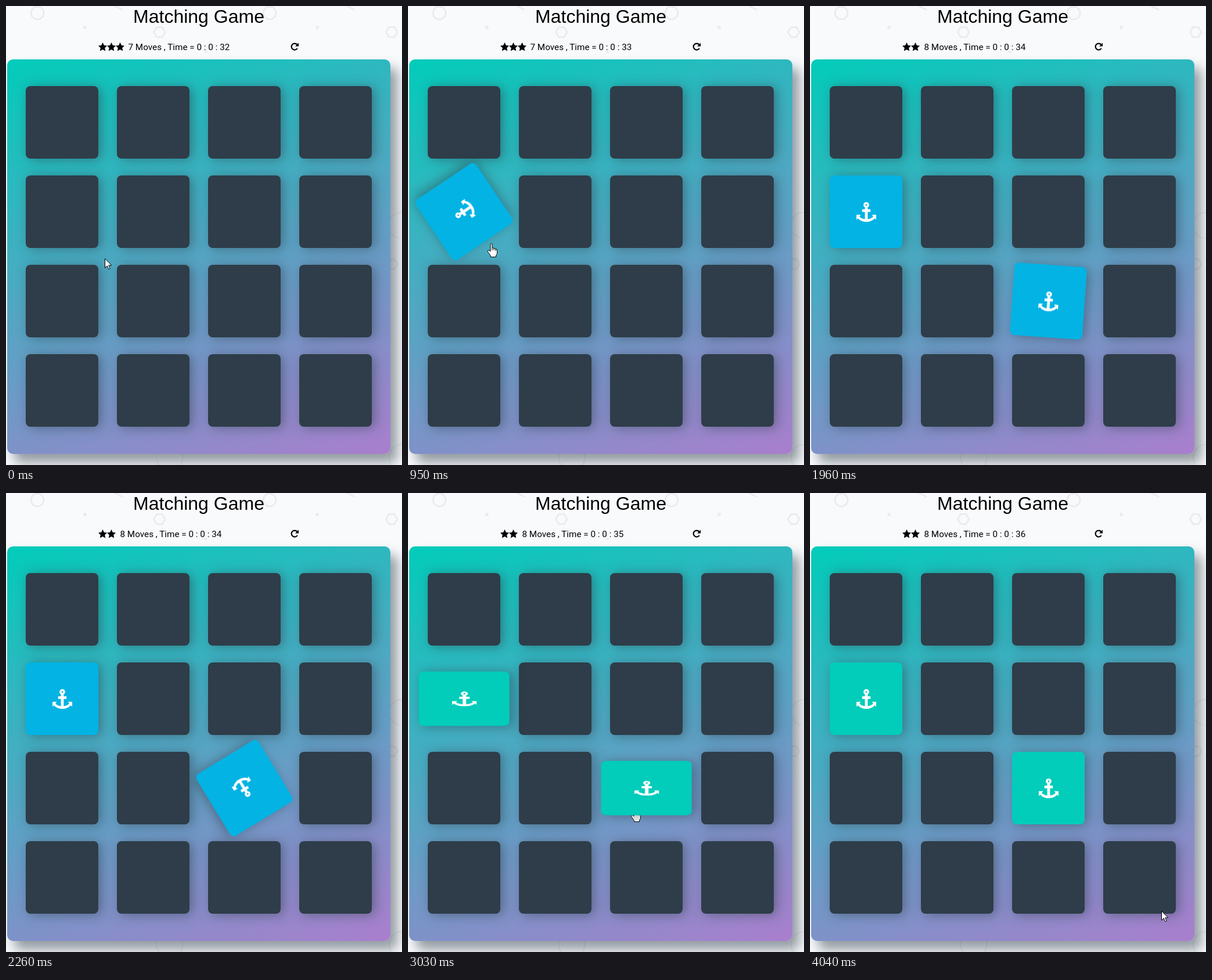
These frames come from a looping animation (682x791 px, 4120 ms). An HTML page:

```html
<!DOCTYPE html>
<html lang="en">
<head>
<meta charset="utf-8">
<title>Matching Game</title>
<style>
html, body { margin: 0; width: 100%; height: 100%; overflow: hidden; background: #f9fafc; }
#stage { position: relative; width: 682px; height: 791px; overflow: hidden; }
#stage > svg { position: absolute; left: 0; top: 0; }
h1 { position: absolute; left: 2px; top: 0; width: 660px; margin: 0; text-align: center;
  font: 32px/36px "Liberation Sans", Arial, sans-serif; color: #000; }
#score { font: 15.25px Roboto, sans-serif; }
#board { position: absolute; left: 2px; top: 92px; width: 660px; height: 680px; border-radius: 10px;
  background: linear-gradient(160deg, #02ccba 0%, #aa7ecd 100%);
  box-shadow: 12px 15px 20px 0 rgba(46, 61, 73, .5);
  display: grid; grid: repeat(4, 125px) / repeat(4, 125px); gap: 29px 32px;
  padding: 46px 32px; box-sizing: border-box; }
.card { display: grid; place-items: center; border-radius: 8px; background: #2e3d49;
  box-shadow: 5px 2px 20px 0 rgba(46, 61, 73, .5); }
.card svg { width: 34px; height: 34px; fill: #fff; opacity: 0; }

/* All animations are paused; the script moves their clock. */
.card, .card svg, .cursor, .cursor path { animation-play-state: paused !important; }
.pair { position: relative; z-index: 1;
  animation: spin 1s ease var(--open) both, band 1s ease 2730ms,
    opened 1ms var(--open) forwards, matched 1ms 2730ms forwards; }
.pair svg { animation: show 1ms var(--open) forwards; }
@keyframes spin { from { transform: rotate(0deg); } to { transform: rotate(360deg); } }
@keyframes band {
  0%, 100% { transform: scale(1, 1); }
  30% { transform: scale(1.25, .75); }
  40% { transform: scale(.75, 1.25); }
  50% { transform: scale(1.15, .85); }
  65% { transform: scale(.95, 1.05); }
  75% { transform: scale(1.05, .95); }
}
@keyframes opened { from, to { background: #02b3e4; } }
@keyframes matched { from, to { background: #02ccba; } }
@keyframes show { from, to { opacity: 1; } }

.cursor { fill: #fff; stroke: #000; stroke-linejoin: round; animation: travel 4120ms linear both; }
.arrow { animation: arrow 4120ms step-end both; }
.hand { animation: hand 4120ms step-end both; }
@keyframes travel {
  0% { transform: translate(170px, 435px); }
  4.1%, 7.2% { transform: translate(162px, 429px); }
  11.6% { transform: translate(143px, 409px); }
  24.3% { transform: translate(143px, 409px); animation-timing-function: ease; }
  34.8%, 98.04% { transform: translate(390px, 543px); }
  98.05%, 100% { transform: translate(605px, 720px); }
}
@keyframes arrow { 0%, 98.05%, 100% { opacity: 1; } 10.6% { opacity: 0; } }
@keyframes hand { 0%, 98.05%, 100% { opacity: 0; } 10.6% { opacity: 1; } }
</style>
</head>
<body>
<div id="stage">
  <svg width="682" height="791">
    <defs>
      <pattern id="doodles" width="400" height="400" patternUnits="userSpaceOnUse">
        <g fill="none" stroke="#ebecef" stroke-width="3">
          <circle cx="54" cy="12" r="11"/>
          <path d="M254.500 45l5-8.500h9.500l5 8.500-5 8.500h-9.500zM184-2l17 9"/>
          <circle cx="282" cy="378" r="22.500" stroke-width="2"/>
        </g>
        <g fill="#ebecef"><circle cx="136" cy="37" r="3"/><circle cx="344" cy="79" r="2.500"/></g>
      </pattern>
      <path id="star" d="M0-7.800L2.300-2.700 7.500-2.100 3.700 1.700 4.700 7 0 4.500-4.700 7-3.700 1.700-7.500-2.100-2.300-2.700Z"/>
    </defs>
    <rect width="682" height="791" fill="url(#doodles)"/>
    <use href="#star" x="166.500" y="70.500"/>
    <use href="#star" x="181.500" y="70.500"/>
    <use href="#star" x="196.500" y="70.500" id="thirdStar"/>
    <text id="score" y="76">7 Moves , Time = 0 : 0 : 32</text>
    <path d="M501.300 66.500A5.500 5.500 0 1 0 501.800 73" fill="none" stroke="#000" stroke-width="2.200"/>
    <path d="M504 63.500v6h-6z"/>
  </svg>
  <h1>Matching Game</h1>
  <div id="board"></div>
  <svg width="682" height="791">
    <g class="cursor">
      <path class="arrow" d="M.5.500V16.300L4.200 12.800 6.900 18.700 9.300 17.600 6.700 11.900H11.700Z"/>
      <path class="hand" d="M-1 14V2Q-1 .5.500.500T2 2V8Q4.700 7 5 9 7.700 8 8 10 10.500 9.500 10.500 12V17Q10.500 19 8.500 21V23.500H-.5V21.500L-5 15.500Q-6.500 13-5 12-3.500 11.500-1 14ZM2 8V12M5 9V12M8 10V13"/>
    </g>
  </svg>
</div>
<script>
const LOOP = 4120;
const SECOND_CARD = 1938;
const openTimes = { 4: 568, 10: SECOND_CARD };
const anchor = `<svg viewBox="0 0 1792 1792"><path fill-rule="evenodd" d="M896 0a256 256 0 0 1 128 478V640H1230
  q50 0 50 50V846q0 50-50 50H1024V1543Q1362 1500 1522 1300L1400 1152H1750q42 0 42 42V1590L1662 1470
  Q1362 1792 896 1792T130 1470L0 1590V1194q0-42 42-42H392L270 1300Q430 1500 768 1543V896H562
  q-50 0-50-50V690q0-50 50-50H768V478A256 256 0 0 1 896 0ZM896 180a76 76 0 1 0 1 0Z"/></svg>`;

const byId = id => document.getElementById(id);
const score = byId("score"), thirdStar = byId("thirdStar");

byId("board").innerHTML = Array.from({ length: 16 }, (_, i) => i in openTimes
  ? `<div class="card pair" style="--open:${openTimes[i]}ms">${anchor}</div>`
  : `<div class="card"></div>`).join("");

// Bursts of evenly spaced picture changes: first, last, count.
const bursts = [[0, 0, 1], [90, 170, 2], [320, 790, 7], [870, 1330, 7], [1410, 1560, 3],
  [1960, 2420, 7], [2490, 2960, 7], [3030, 3500, 7], [3570, 3810, 4], [4040, 4040, 1]];
const ticks = bursts.flatMap(([first, last, count]) => Array.from({ length: count }, (_, i) =>
  Math.round((first + (last - first) * i / Math.max(1, count - 1)) / 10) * 10));

const animations = document.getAnimations();
const start = performance.now();
let shown = -1;

function render(t) {
  for (const animation of animations) animation.currentTime = t;
  const second = t >= SECOND_CARD;
  const seconds = 32 + Math.floor((t + 680) / 1000);
  score.textContent = `${second ? 8 : 7} Moves , Time = 0 : 0 : ${seconds}`;
  score.setAttribute("x", second ? 196.5 : 210.5);
  thirdStar.style.display = second ? "none" : "";
}

function frame() {
  const t = (performance.now() - start) % LOOP;
  const tick = ticks.findLast(time => time <= t);
  if (tick !== shown) render(shown = tick);
  requestAnimationFrame(frame);
}
frame();
</script>
</body>
</html>
```
